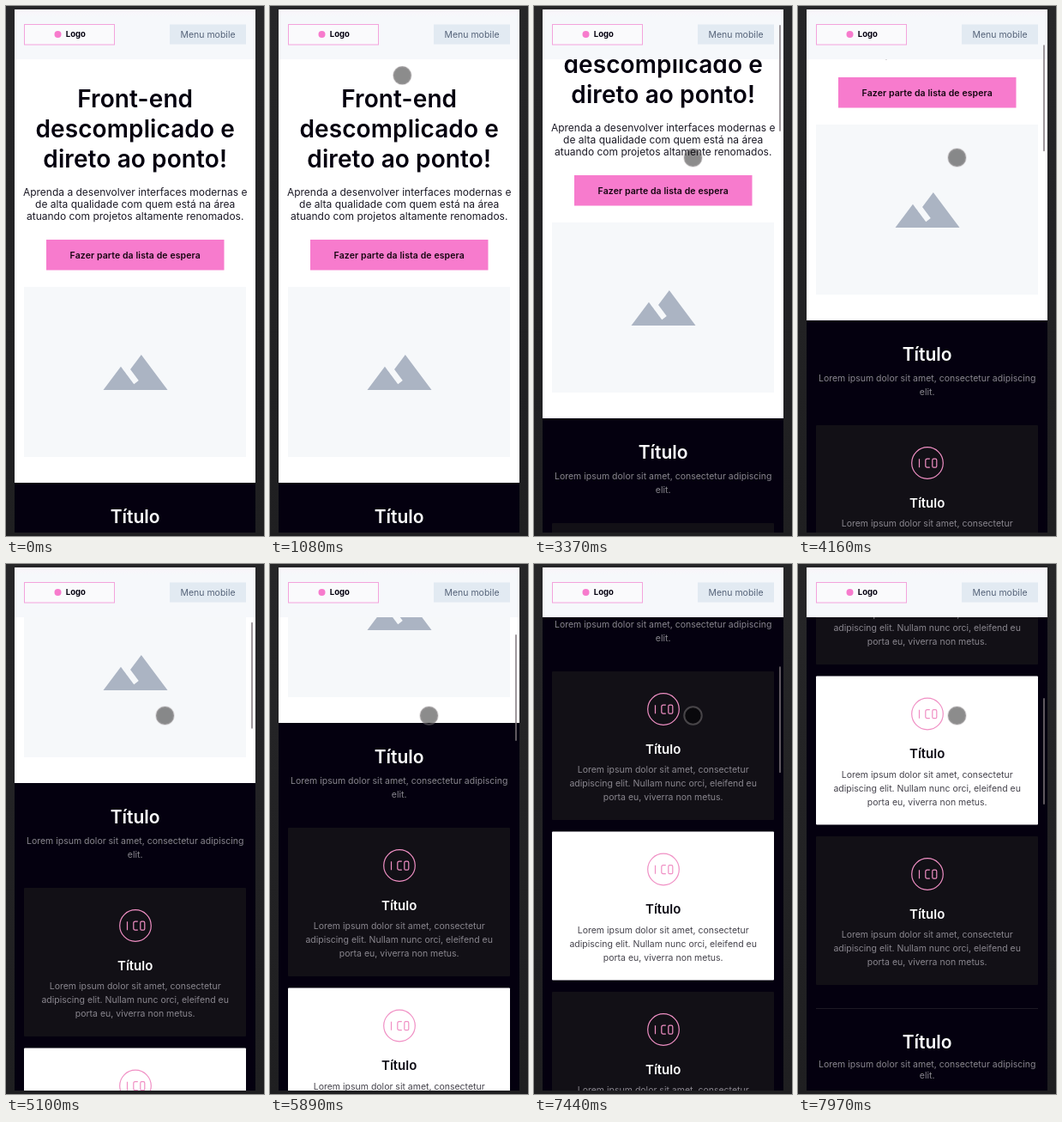
These frames come from a looping animation (301 by 617 pixels, 8 s). An HTML page:

```html
<!DOCTYPE html>
<html lang="pt-BR">
<head>
<meta charset="utf-8">
<title>Landing page</title>
<style>
  html, body { margin: 0; width: 100%; height: 100%; overflow: hidden; background: #222224; }
  svg { display: block; width: 100%; height: 100%; font-family: Inter, "Noto Sans", sans-serif; }
  text { text-anchor: middle; }
  .h1 { font-size: 28px; font-weight: 600; fill: #04000f; letter-spacing: .1px; }
  .h2 { font-size: 21px; font-weight: 600; fill: #fff; }
  .h3 { font-size: 15px; font-weight: 600; fill: #fff; }
  .lead { font-size: 12px; fill: #1c1a26; }
  .copy { font-size: 10.5px; fill: #89868e; }
  .btn { font-size: 10.5px; font-weight: 600; fill: #14040f; letter-spacing: .09px; }
  .menu { font-size: 10.5px; fill: #56647a; }
  .logo { font-size: 9.5px; font-weight: 700; fill: #04000f; }
  .light .h3 { fill: #0c0a14; }
  .light .copy { fill: #45434c; }
  .ico { fill: none; stroke: #f08fc4; stroke-width: 1.2; }
</style>
</head>
<body>
<svg viewBox="0 0 301 617">
  <defs>
    <clipPath id="view"><rect x="10" y="4" width="281" height="609"/></clipPath>
    <linearGradient id="frame" x2="0" y2="1">
      <stop offset="0" stop-color="#262628"/>
      <stop offset="1" stop-color="#1f1f21"/>
    </linearGradient>
    <linearGradient id="bar" x2="0" y2="1">
      <stop offset="0" stop-color="#faf4fa"/>
      <stop offset=".15" stop-color="#f6f8fb"/>
    </linearGradient>
    <g id="icon" class="ico">
      <circle r="18.3"/>
      <path d="M-9.5-4.8v10M2.8-4.8h-3q-2 0-2 2v6q0 2 2 2h3"/>
      <rect x="5.8" y="-4.8" width="5" height="10" rx="1.5"/>
    </g>
  </defs>

  <rect width="301" height="617" fill="url(#frame)"/>
  <g clip-path="url(#view)">
    <g id="page">
      <rect x="10" y="4" width="281" height="552" fill="#fff"/>
      <rect x="47" y="272" width="207.5" height="35.5" fill="#f77bcd"/>
      <text class="btn" x="150.7" y="293.7">Fazer parte da lista de espera</text>
      <rect x="21" y="327" width="259" height="198" fill="#f6f8fa"/>
      <path fill="#abb4c3" transform="translate(110.1 385.6) scale(3.41)"
        d="M14 6l-3.75 5 2.85 3.8-1.6 1.2C9.81 13.75 7 10 7 10l-6 8h22z"/>
      <rect x="10" y="555" width="281" height="900" fill="#04000f"/>
      <path d="M21 1250.5h259" stroke="#1d1a24"/>
    </g>
    <rect x="10" y="4" width="281" height="58" fill="url(#bar)"/>
    <rect x="21.5" y="21.5" width="105" height="23.5" fill="#fafafc" stroke="#f3a3dc"/>
    <circle cx="60.5" cy="33" r="4" fill="#f77bcd"/>
    <text class="logo" x="81.3" y="36.2">Logo</text>
    <rect x="191" y="21.5" width="89" height="23" fill="#e2eaf2"/>
    <text class="menu" x="235.5" y="36.5">Menu mobile</text>
    <rect id="thumb" x="286" width="2" height="124" rx="1" fill="#7d757b" fill-opacity=".75"/>
    <g id="touch">
      <circle r="10.5" fill="#000" fill-opacity=".45"/>
      <circle r="10.2" fill="none" stroke="#a8a4a6" stroke-opacity=".38" stroke-width="2"/>
    </g>
  </g>
</svg>
<script>
const LOOP = 8000, MID = 150.7;
const $ = id => document.getElementById(id);
const page = $('page'), thumb = $('thumb'), touch = $('touch');

function add(parent, tag, attrs, text = '') {
  const el = document.createElementNS('http://www.w3.org/2000/svg', tag);
  for (const k in attrs) el.setAttribute(k, attrs[k]);
  el.textContent = text;
  return parent.appendChild(el);
}

function lines(parent, cls, y, step, rows) {
  rows.forEach((row, i) => add(parent, 'text', { class: cls, x: MID, y: y + i * step }, row));
}

const intro = ['Lorem ipsum dolor sit amet, consectetur adipiscing', 'elit.'];
const body = ['Lorem ipsum dolor sit amet, consectetur',
  'adipiscing elit. Nullam nunc orci, eleifend eu',
  'porta eu, viverra non metus.'];

function card(y, light) {
  const g = add(page, 'g', { class: light ? 'light' : 'dark', transform: `translate(0 ${y})` });
  add(g, 'rect', { x: 21, width: 259, height: 173, rx: 1, fill: light ? '#fff' : '#121016' });
  add(g, 'use', { href: '#icon', x: 151, y: 44 });
  lines(g, 'h3', 95.7, 0, ['Título']);
  lines(g, 'copy', 118, 16, body);
}

lines(page, 'h1', 118, 35, ['Front-end', 'descomplicado e', 'direto ao ponto!']);
lines(page, 'lead', 221, 14, ['Aprenda a desenvolver interfaces modernas e',
  'de alta qualidade com quem está na área', 'atuando com projetos altamente renomados.']);
lines(page, 'h2', 602, 0, ['Título']);
lines(page, 'copy', 626, 16, intro);
[677, 863.5, 1050].forEach((y, i) => card(y, i === 1));
lines(page, 'h2', 1297, 0, ['Título']);
lines(page, 'copy', 1319, 13, intro);

// Rows are [time, ...values]
const scroll = [[3120, 0], [3360, 75], [3690, 75], [3970, 150], [4025, 150], [4290, 225],
  [4770, 225], [5090, 300], [5690, 300], [5930, 375], [5955, 375], [6225, 450],
  [6620, 450], [6960, 525], [7270, 525], [7440, 552], [7490, 552], [7590, 600],
  [7630, 600], [7770, 675], [7870, 675], [7970, 733]];
const path = [[270, 226, 19], [400, 212, 48], [610, 190, 98], [780, 189, 98],
  [1000, 165, 88], [1250, 132, 66], [1400, 125, 63], [1550, 126, 70],
  [1620, 110, 76], [1760, 66, 86], [1960, 145, 72], [2080, 206, 38], [2150, 220, 45],
  [2210, 220, 45], [2420, 124, 154], [2490, 112, 170], [2620, 101, 202],
  [2740, 160, 186], [2810, 185.5, 176.5]];
const fade = [[3170, 0], [3180, 1], [4500, 1], [4690, 0], [4820, 0], [4830, 1],
  [5370, 1], [5560, 0], [5690, 0], [5700, 1]];

const linear = p => p;
const smooth = p => p * p * (3 - 2 * p);

function at(rows, t, ease = linear) {
  const i = rows.findIndex(r => r[0] > t);
  if (i === 0) return rows[0].slice(1);
  if (i < 0) return rows[rows.length - 1].slice(1);
  const a = rows[i - 1], b = rows[i];
  const p = ease((t - a[0]) / (b[0] - a[0]));
  return a.slice(1).map((v, k) => v + (b[k + 1] - v) * p);
}

function draw() {
  const t = performance.now() % LOOP;
  const y = Math.round(at(scroll, t, smooth)[0]);
  const [cx, cy] = at(path, t);
  page.setAttribute('transform', `translate(0 ${-y})`);
  thumb.setAttribute('y', 6.8 + y * 0.2035);
  thumb.setAttribute('opacity', at(fade, t)[0]);
  touch.setAttribute('transform', `translate(${cx} ${cy})`);
  touch.setAttribute('opacity', t < 270 ? 0 : 1);
  requestAnimationFrame(draw);
}
draw();
</script>
</body>
</html>
```
